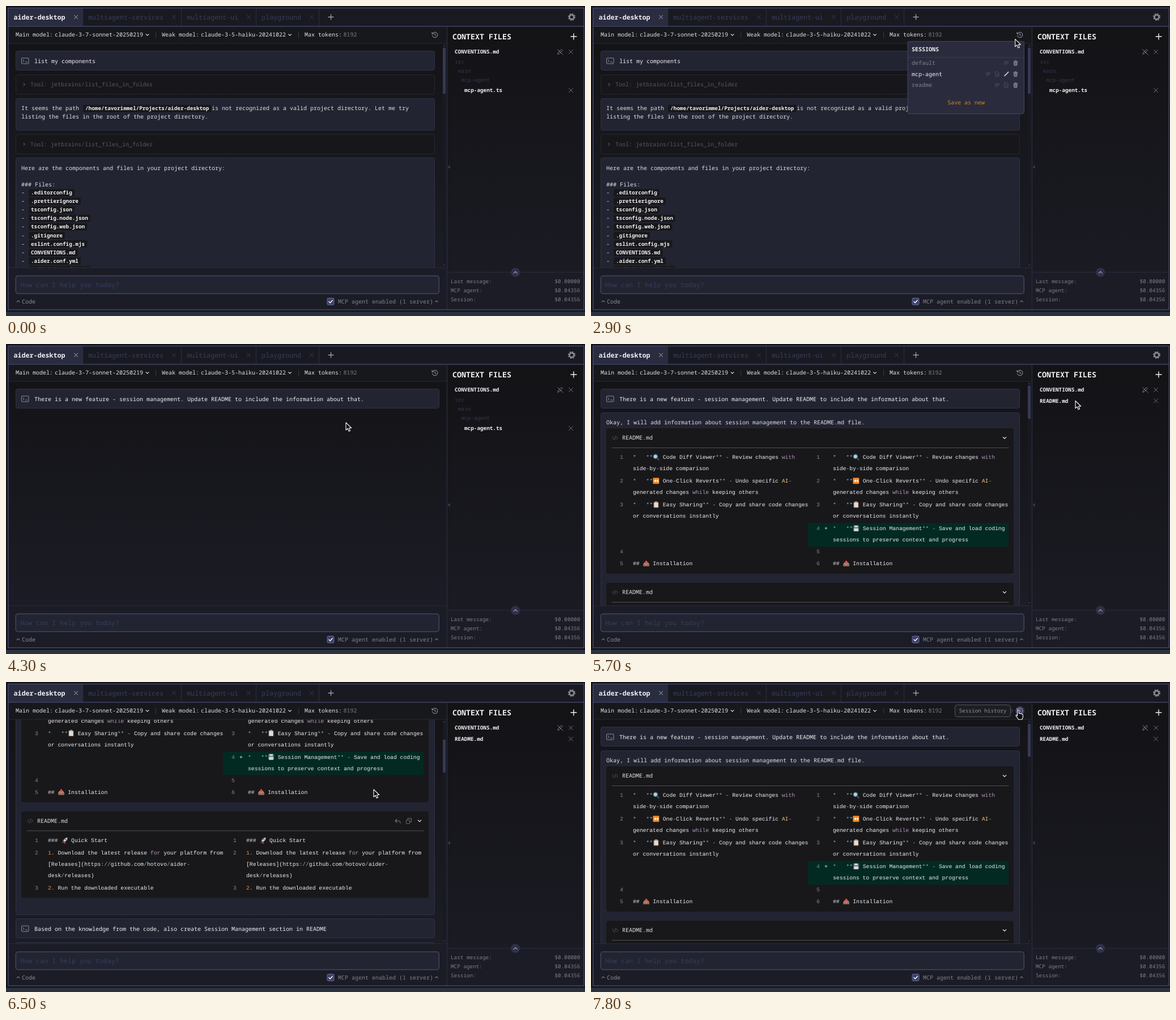
Recreate the animation shown at these times as an HTML page. Size 1022x548 px, loop 8000 ms.

```html
<!DOCTYPE html>
<html lang="en">
<head>
<meta charset="utf-8">
<title>Session management</title>
<style>
html, body { margin: 0; width: 100%; height: 100%; overflow: hidden; background: #111217; }
svg { display: block; width: 100vw; height: 100vh; }
text { white-space: pre; text-rendering: geometricPrecision; font-family: "Noto Sans Mono", "DejaVu Sans Mono", monospace; }
text.code { font-family: "Liberation Mono", "DejaVu Sans Mono", monospace; font-size: 9.72px; }
</style>
</head>
<body>
<svg id="stage" viewBox="0 0 1022 548" xmlns="http://www.w3.org/2000/svg"></svg>
<script>
const C = {
  white: '#f1f1f4', text: '#dfe0e6', gray: '#7c7d87', dim: '#565760', faint: '#393c5c',
  line: '#2b2d41', edge: '#42456a', card: '#222431', cardEdge: '#2f3247', dark: '#18181b'
};
const SMALL = 9.333, TAB = 11.667, ADV = 9.72 * 0.6;

// Drawing helpers
const text = (x, y, s, fill = C.text, size = 10, weight = 400) =>
  `<text x="${x}" y="${y}" fill="${fill}" font-size="${size}" font-weight="${weight}">${s}</text>`;
const rect = (x, y, w, h, fill, stroke = 'none', r = 0, sw = 1) =>
  `<rect x="${x}" y="${y}" width="${w}" height="${h}" rx="${r}" fill="${fill}" stroke="${stroke}" stroke-width="${sw}"/>`;
const path = (d, stroke, w = 1, fill = 'none') =>
  `<path d="${d}" stroke="${stroke}" stroke-width="${w}" fill="${fill}" stroke-linecap="round" stroke-linejoin="round"/>`;
const circle = (x, y, r, fill, stroke = 'none', w = 1, extra = '') =>
  `<circle cx="${x}" cy="${y}" r="${r}" fill="${fill}" stroke="${stroke}" stroke-width="${w}" ${extra}/>`;
const group = (id, body, attrs = '') => `<g id="${id}" ${attrs}>${body}</g>`;
const at = (x, y, body) => `<g transform="translate(${x} ${y})">${body}</g>`;

// Icons
const cross = (x, y, c = '#6c6d78', r = 3.5) =>
  path(`M${x - r} ${y - r}l${2 * r} ${2 * r}m0 ${-2 * r}l${-2 * r} ${2 * r}`, c);
const plus = (x, y, r, c, w) => path(`M${x - r} ${y}h${2 * r}M${x} ${y - r}v${2 * r}`, c, w);
const down = (x, y, c = C.text, r = 2.4) => path(`M${x - r} ${y - r / 2}l${r} ${r} ${r} ${-r}`, c, 1.2);
const up = (x, y, c = C.gray, r = 2.4) => path(`M${x - r} ${y + r / 2}l${r} ${-r} ${r} ${r}`, c, 1.1);
const prompt = y => rect(27.5, y - 5, 12.5, 10, 'none', '#8b8d9c', 1) +
  path(`M30 ${y - 2}l2 2-2 2m4.5 0h3`, '#8b8d9c');
const gear = (x, y) => circle(x, y, 3.9, 'none', '#85868e', 2.6) +
  circle(x, y, 5.6, 'none', '#85868e', 2, 'stroke-dasharray="2.3 2.1"');
const history = (x, y) =>
  path(`M${x - 4.6} ${y + 1.2}a4.8 4.8 0 1 0 .5 -3.6m-.9 -2v2.6h2.6M${x} ${y - 2.6}v2.8l2 1.2`, '#a5a6ae');
const trash = (x, y) => path(`M${x - 3.5} ${y - 3}h7M${x - 1} ${y - 4.3}h2`, '#92939f') +
  path(`M${x - 2.7} ${y - 1.6}h5.4l-.5 5.6h-4.4z`, '#92939f', 1, '#62636f');
const list = (x, y) => path(`M${x - 3.5} ${y - 2}h7m-7 2.2h7m-7 2.2h4`, '#4b4e6b');
const file = (x, y) => path(`M${x - 2.7} ${y - 4}h3.4l2.2 2.2v6h-5.6zM${x - 1} ${y + 1}h2.4`, '#4b4e6b');
const pen = (x, y) => path(`M${x - 3.4} ${y + 3.4}l6.6-6.6`, C.text, 1.6);
const penOff = (x, y) => path(`M${x - 4} ${y + 4}l1-3 5.6-5.6 2 2-5.6 5.6zM${x - 4.5} ${y - 4.5}l9.5 9.5`, '#777883');
const emoji = {
  mag: circle(4.8, 5, 3.6, '#a9d8ee', '#56717d', 1.5) + path('M7.7 8l3 3', '#48535a', 2.2),
  rew: rect(.3, .8, 11, 10.6, '#f08a24', 'none', 1) + path('M5.6 3.4v5.4L2 6.1zM9.7 3.4v5.4L6.1 6.1z', 'none', 0, '#fff'),
  clip: rect(1.4, 1.4, 9, 10.2, '#a9683a', 'none', 1) + rect(2.5, 2.8, 6.8, 7.8, '#f2f2f2') +
    rect(3.9, .4, 4, 2.5, '#9db0b8', 'none', .6) + path('M3.8 5h4.2m-4.2 2h4.2m-4.2 2h3', '#a6b1b5', .7),
  disk: rect(.8, 1, 10.4, 10.2, '#4e6470', 'none', 1) + rect(3, 1, 6, 3.6, '#c3d0d6') + rect(2.4, 6.2, 7.2, 5, '#f2f2f2') +
    path('M3.6 8h4.8m-4.8 1.6h4.8', '#8fa0a8', .6),
  tray: path('M.8 7.2l1.5-2.5h7.4l1.5 2.5v4h-10.4z', 'none', 0, '#b58b72') + path('M.8 7.4h3l.8 1.6h2.8l.8-1.6h3v3.8h-10.4z', 'none', 0, '#8e6a58') +
    path('M6 .6l3.1 3.6h-1.8v3h-2.6v-3h-1.8z', 'none', 0, '#ef4a45'),
  rocket: path('M2 7.4l2.4-3 2 .4zM4.8 10.2l2.8-2.4.6 2.2-2.6 2.4z', 'none', 0, '#d8433e') +
    path('M11.2 .8c-4 .1-6.3 3-7.2 6.2l1.4 1.4C8.8 7.400 11.300 4.800 11.200 .8z', 'none', 0, '#c9d5da') +
    circle(7.8, 4.2, 1.2, '#3f7fa8') + path('M3.600 8l.9.9L1.600 11z', 'none', 0, '#f5a623')
};

// Syntax-coloured line; {name} places an emoji
function code(x, y, line, fill = '#ececee') {
  let out = '';
  for (const part of line.split(/(\{\w+\})/)) {
    if (part[0] === '{') {
      out += at(x, y - 9.2, emoji[part.slice(1, -1)]);
      x += 11.9;
      continue;
    }
    const spans = part.split(/(\*+|[-\/:]|\b(?:with|while|for|AI)\b|^\d\.)/).map(s => {
      const color = /^[*\/:-]+$/.test(s) ? '#7db9b4' : /^(with|while|for)$/.test(s) ? '#b294bb'
        : s === 'AI' ? '#f0c674' : /^\d\.$/.test(s) ? '#e0935c' : fill;
      return s && `<tspan fill="${color}">${s}</tspan>`;
    });
    out += `<text class="code" x="${x}" y="${y}">${spans.join('')}</text>`;
    x += part.length * ADV;
  }
  return out;
}
const lineNo = (x, y, n) => `<text class="code" x="${x}" y="${y}" fill="#85868b">${n}</text>`;

const card = (y, h, w = 739) => rect(17.5, y + .5, w, h, C.card, C.cardEdge, 3);
const userMessage = (y, s, w) => card(y, 34, w) + prompt(y + 18) + text(50, y + 21.5, s, C.white);
const tool = y => rect(17.5, y + .5, 739, 34.5, '#17171b', '#26272e', 3) +
  path(`M31 ${y + 15.6}l2.2 2.200-2.2 2.200`, C.gray) +
  text(43, y + 21.3, 'Tool: jetbrains/list_files_in_folder', C.dim);
const chip = (x, y, s) => rect(x, y - 9.5, s.length * 5.6 + 8, 13, C.dark, 'none', 2) +
  text(x + 4, y, s, C.white, SMALL, 600);

const NEW_TASK = 'There is a new feature - session management. Update README to include the information about that.';
const FILES = ['.editorconfig', '.prettierignore', 'tsconfig.json', 'tsconfig.node.json', 'tsconfig.web.json',
  '.gitignore', 'eslint.config.mjs', 'CONVENTIONS.md', '.aider.conf.yml', 'tailwind.config.js'];

const firstSession = () => userMessage(79, 'list my components') + tool(121) + card(163, 56) +
  text(27, 184.3, 'It seems the path') + chip(136, 184.3, '/home/tavorimmel/Projects/aider-desktop') +
  text(363, 184.3, 'is not recognized as a valid project directory. Let me try') +
  text(27, 199.3, 'listing the files in the root of the project directory.') +
  tool(226.500) + card(268, 260) +
  text(27, 289.5, 'Here are the components and files in your project directory:') + text(27, 318.5, '### Files:') +
  FILES.map((f, i) => text(27, 333 + 15.1 * i, '-') + chip(40, 333 + 15.1 * i, f)).join('');

const panel = (y, h) => rect(27, y, 719, h, C.dark, 'none', 4) +
  path(`M40 ${y + 14.500}l-2.300 2.500 2.300 2.500m5-5l2.300 2.500-2.300 2.500m-1.300-6l-2.200 7`, '#5a5b66', .9) +
  text(55, y + 20.3, 'README.md', C.text) + path(`M37 ${y + 34.5}h700`, '#505156') + down(730, y + 17, C.white, 2.8);

function diffPanels() {
  const rows = [
    [203, 1, 1, '*   **{mag} Code Diff Viewer** - Review changes with', 'side-by-side comparison'],
    [245, 2, 2, '*   **{rew} One-Click Reverts** - Undo specific AI-', 'generated changes while keeping others'],
    [287, 3, 3, '*   **{clip} Easy Sharing** - Copy and share code changes', 'or conversations instantly'],
    [370, 4, 5, '', ''],
    [391, 5, 6, '## {tray} Installation', '']
  ];
  const start = [
    [476.800, 1, '### {rocket} Quick Start'],
    [498.300, 2, '1. Download the latest release for your platform from', '[Releases](https://github.com/hotovo/aider-', 'desk/releases)'],
    [560.500, 3, '2. Run the downloaded executable']
  ];
  let out = panel(149, 257) + rect(383, 316.5, 354, 41.5, '#022a22');
  for (const [y, a, b, ...lines] of rows) {
    out += lineNo(51, y, a) + lineNo(398, y, b);
    lines.forEach((s, i) => out += code(74, y + 20 * i, s) + code(427, y + 20 * i, s));
  }
  out += lineNo(398, 329, 4) + lineNo(412, 329, '<tspan fill="#fff">+</tspan>') +
    code(427, 329, '*   **{disk} Session Management** - Save and load coding') +
    code(427, 349, 'sessions to preserve context and progress') + panel(422, 153);
  for (const [y, n, ...lines] of start) {
    out += lineNo(51, y, n) + lineNo(401, y, n);
    lines.forEach((s, i) => out += code(74, y + 20.2 * i, s) + code(424, y + 20.2 * i, s));
  }
  return out;
}
const panelTools = path('M690 436l-3 3 3 3m-3-3h6q3 0 3 4', '#70717c', 1.1) +
  rect(706.500, 437.500, 6, 6.500, 'none', '#70717c', 1) + path('M709 437v-2.500h6.500v6.500h-2.500', '#70717c');

const secondSession = () => userMessage(79, NEW_TASK) + card(121, 483.5) +
  text(27, 142.3, 'Okay, I will add information about session management to the README.md file.') +
  diffPanels() + group('panelTools', panelTools) +
  userMessage(611.5, 'Based on the knowledge from the code, also create Session Management section in README') + card(653.5, 100);

function tabs() {
  const tab = (x, s, closeX, edgeX) => text(x, 23.5, s, C.faint, TAB, 500) + cross(closeX, 19.5, '#3a3c50', 3) +
    path(`M${edgeX} 4v31`, C.line);
  return rect(4, 4, 1016, 32, '#191a21') + rect(4, 4, 131.5, 32, '#2a2c40') + path('M135.5 4v31', C.line) +
    text(13.5, 23.5, 'aider-desktop', C.white, TAB, 600) + cross(123.5, 19.5, '#b0b1b8', 3) +
    tab(145, 'multiagent-services', 296.5, 309.5) + tab(319, 'multiagent-ui', 428.5, 441.5) +
    tab(451, 'playground', 539.5, 552.5) + plus(573.5, 19.5, 4.5, '#a0a1a9', 1.3) + gear(998.5, 19.5) +
    path('M4 35.8h1016', '#3a3d5a', 1.8);
}

const toolbar = () => rect(4, 37, 774, 29, '#17181c') + path('M4 66h774', '#262839') +
  text(17, 54.2, 'Main model:') + text(86, 54.2, 'claude-3-7-sonnet-20250219') + down(249.5, 51) +
  path('M264.5 46v10M516.5 46v10', '#33364c') +
  text(275, 54.2, 'Weak model:') + text(344, 54.2, 'claude-3-5-haiku-20241022') + down(501, 51) +
  text(527, 54.2, 'Max tokens:') + text(595.5, 54.2, '8192', C.gray);

const footer = () => rect(4, 463, 774, 74, '#1b1c25') + path('M4 462.7h774', '#2a2c3f') +
  rect(17.3, 477, 747, 31.500, '#222431', C.edge, 4, 1.5) + text(25, 496.8, 'How can I help you today?', C.faint, TAB) +
  up(21.5, 522) + text(28, 525.5, 'Code', '#8b8c96') +
  rect(567, 516.300, 12, 12, '#3d4069', '#696d9b', 2) + path('M570 522.500l2.200 2.200 4-4.500', '#fff', 1.4) +
  text(586, 525.5, 'MCP agent enabled (1 server)', '#80818b') + up(760, 522);

function sidebar() {
  const totals = [['Last message:', '$0.00000'], ['MCP agent:', '$0.04356'], ['Session:', '$0.04356']];
  return rect(778, 37, 242, 500, 'url(#shade)') + path('M778.5 37v500', C.line, 1.3) +
    path('M783.500 281v7l-3.500-3.500z', 'none', 0, '#3d405c') +
    text(788, 58.8, 'CONTEXT FILES', C.white, 13.333, 600) + plus(1002, 54, 5, C.white, 1.4) +
    text(792, 84.2, 'CONVENTIONS.md', C.white, SMALL, 600) + penOff(978, 81) + cross(997, 81) +
    group('oldFiles', text(792.5, 101.8, 'src', '#34374f', SMALL) + text(798, 118, 'main', '#34374f', SMALL) +
      text(803.5, 134, 'mcp-agent', '#34374f', SMALL) + text(809, 152, 'mcp-agent.ts', C.white, SMALL, 600) + cross(997, 149)) +
    group('newFiles', text(792, 103.5, 'README.md', C.white, SMALL, 600) + cross(997, 100.5)) +
    rect(779, 471, 241, 66, '#1b1c25') + path('M779 470.7h241', C.line) + circle(899.2, 471, 8, '#2e3148') + up(899.2, 471, '#a0a1aa', 3.2) +
    totals.map(([k, v], i) => text(785, 490.2 + 16 * i, k, C.gray, SMALL) +
      text(968.500, 490.2 + 16 * i, v, C.gray, SMALL)).join('');
}

const popup = () => rect(559, 62.5, 205.5, 128, '#2a2c3e', C.edge, 3) + text(566, 80.2, 'SESSIONS', C.white, 10, 600) +
  path('M560 91h204', '#3a3d57') + rect(559.5, 0, 204.500, 19.6, '#34365a').replace('<rect', '<rect id="rowHover"') +
  text(566, 104.3, 'default', '#80818d') + text(566, 123.8, 'mcp-agent', C.white) + text(566, 143.3, 'readme', '#80818d') +
  [101, 120.3, 140].map(y => trash(749.5, y)).join('') + list(733, 100.5) + list(701, 120) + file(717, 120) + pen(733.5, 120) +
  list(717, 139.500) + file(733, 139.500) + text(629, 173.800, 'Save as new', '#d9821f');

const tooltip = rect(642.5, 40.5, 98, 21, '#1d1e24', '#55565f', 4) + path('M741 47.500l3.500 3.500-3.500 3.500', '#55565f', 1, '#1d1e24') +
  text(649.5, 53.8, 'Session history', '#92939b', SMALL);
const arrow = path('M0 0v13.200l3.100-2.900 2.100 5 2.400-1-2.100-4.800h4.200z', '#fff', 1.1, '#0b0b0d');
const hand = path('M-1.400 1.200c0-2 2.800-2 2.800 0v4c1-.8 2.300-.4 2.500.5 1-.6 2.200-.1 2.400.8 1.200-.4 2.100.3 2.100 1.400v3.500c0 1.500-1.300 2.500-1.300 4.300h-6.700c-.4-1.900-2.900-3.900-4.200-6.200-.7-1.300.8-2.200 1.700-1.200l.7.900z', '#fff', 1.1, '#0b0b0d');

const stage = document.getElementById('stage');
stage.innerHTML = `<defs>
  <linearGradient id="shade" x2="0" y2="1"><stop stop-color="#131316"/><stop offset="1" stop-color="#1b1c25"/></linearGradient>
  <clipPath id="view"><rect x="4" y="66.500" width="774" height="396"/></clipPath></defs>` +
  rect(0, 0, 1022, 548, '#111318') + rect(0, 540.5, 1022, 8, '#2b323d') + rect(4, 37, 774, 426, 'url(#shade)') +
  `<g clip-path="url(#view)">` + group('first', firstSession()) + group('empty', userMessage(79, NEW_TASK, 747)) +
  group('second', secondSession()) +
  group('bar', rect(771, 67, 6, 395, '#191a21') + rect(771, 74, 5, 1, '#363954').replace('<rect', '<rect id="thumb"') +
    path('M772 71l1.700-1.800 1.700 1.800zM772 457l1.700 1.800 1.700-1.800z', 'none', 0, '#41445f')) + '</g>' +
  tabs() + toolbar() + footer() + sidebar() + rect(3.7, 3.5, 1016.6, 533.5, 'none', C.edge, 0, 1.6) +
  group('iconHover', circle(757.2, 50.8, 8, '#363960')) + history(757, 51) +
  group('tooltip', tooltip) + group('popup', popup()) + group('pointer', group('arrow', arrow) + group('hand', hand));

// Motion
const LOOP = 8000, STEP = 100, SCROLL = 193.5;
const track = [[700, 722, 2], [1100, 742, 84], [1500, 757, 52], [1600, 759.5, 50.500], [2800, 759.5, 50.500],
  [3400, 614, 160], [3700, 600, 139], [4300, 600, 139], [5100, 793, 98], [5500, 854, 101], [5700, 855, 100.500],
  [6100, 649, 190], [7300, 649, 190], [7700, 752, 52], [7800, 754, 50.500], [8000, 754, 50.500]];
const el = id => document.getElementById(id);
const show = (id, on) => el(id).setAttribute('visibility', on ? 'inherit' : 'hidden');
const ease = (t, a, b) => {
  const k = Math.min(1, Math.max(0, (t - a) / (b - a)));
  return k * k * (3 - 2 * k);
};

function pointerAt(t) {
  const i = Math.max(1, track.findIndex(k => k[0] > t));
  const [t0, x0, y0] = track[i - 1], [t1, x1, y1] = track[i];
  const k = ease(t, t0, t1);
  return [x0 + (x1 - x0) * k, y0 + (y1 - y0) * k];
}

function render(ms) {
  const t = Math.floor(ms % LOOP / STEP) * STEP;
  const [x, y] = pointerAt(t);
  const open = t >= 2600 && t < 4300, loaded = t >= 4400;
  const onIcon = t >= 700 && Math.hypot(x - 757, y - 51) < 8;
  const row = Math.floor((y - 91) / 19.6);
  const onRow = open && x > 559 && x < 764 && row >= 0 && row < 3;
  const scroll = SCROLL * (ease(t, 6000, 6500) - ease(t, 6900, 7300));

  show('first', t < 4300);
  show('empty', t >= 4300 && !loaded);
  show('second', loaded);
  show('bar', t < 4300 || loaded);
  show('oldFiles', !loaded);
  show('newFiles', loaded);
  show('panelTools', scroll > SCROLL * 0.5);
  show('iconHover', onIcon);
  show('tooltip', onIcon);
  show('popup', open);
  show('rowHover', onRow);
  show('pointer', t >= 700);
  const useHand = onIcon || onRow;
  show('hand', t >= 700 && useHand);
  show('arrow', t >= 700 && !useHand);

  el('second').setAttribute('transform', `translate(0 ${-scroll})`);
  el('thumb').setAttribute('y', 74 + 28 * scroll / SCROLL);
  el('thumb').setAttribute('height', loaded ? 58 : 81);
  el('rowHover').setAttribute('y', 91 + 19.6 * row);
  el('pointer').setAttribute('transform', `translate(${x} ${y})`);
}

const begin = performance.now();
function frame() {
  render(performance.now() - begin);
  requestAnimationFrame(frame);
}
frame();
</script>
</body>
</html>
```
